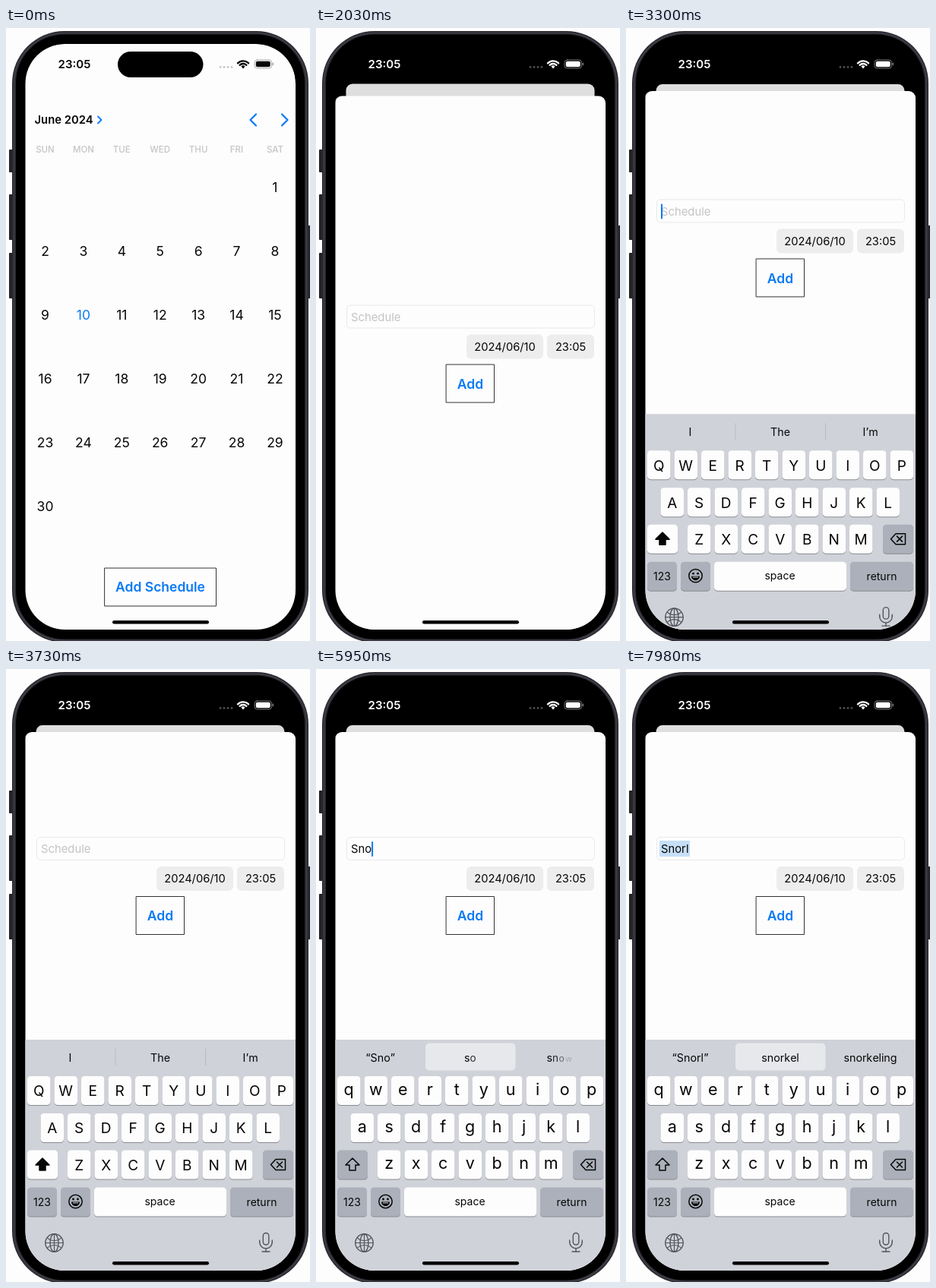
Recreate the animation shown at these times as an HTML page with a canvas. Size 400 px wide and 807 px high, loop 8000 ms.

```html
<!DOCTYPE html>
<html lang="en">
<head>
<meta charset="utf-8">
<title>Schedule app</title>
<style>
  html, body { margin: 0; width: 100%; height: 100%; overflow: hidden; background: #fdfdfd; }
  canvas { display: block; width: 400px; height: 807px; }
</style>
</head>
<body>
<canvas id="stage"></canvas>
<script>
const LOOP = 8000;
const SHEET_START = 1662, FORM_START = 3012, KEYBOARD_START = 3060;
const PAPER = '#fdfdfd', INK = '#060606', BLUE = '#0a7af5', PILL = '#ededee', FAINT = '#c4c4c6';
const KEYBOARD = '#d0d2d9', GRAY_KEY = '#abb0ba', MUTED = '#b9b9bb', ICON = '#53565c';

// Each keystroke: time, field text, whether the word is marked, suggestions.
const typing = [
  { at: FORM_START, text: '', words: ['I', 'The', 'I’m'] },
  { at: 4500, text: 'S', words: ['“S”', 'So', 'She'] },
  { at: 5190, text: 'Sn', words: ['“Sn”', 'an', 'snd'] },
  { at: 5900, text: 'Sno', words: ['“Sno”', 'so', 'snow'] },
  { at: 6540, text: 'Snor', marked: true, words: ['“Snor”', 'snot', 'snoring'] },
  { at: 7400, text: 'Snorl', marked: true, words: ['“Snorl”', 'snorkel', 'snorkeling'] }
];

const canvas = document.getElementById('stage');
const c = canvas.getContext('2d');
const dpr = window.devicePixelRatio || 1;
canvas.width = 400 * dpr;
canvas.height = 807 * dpr;

const clamp = v => Math.max(0, Math.min(1, v));
const mix = (a, b, p) => a + (b - a) * p;
const gray = (a, b, p) => `rgb(${Array(3).fill(Math.round(mix(a, b, p)))})`;

// Critically damped spring, as system transitions use.
function spring(ms) {
  const x = Math.max(0, ms) * 0.01826;
  return 1 - (1 + x) * Math.exp(-x);
}

function roundPath(x, y, w, h, r) {
  c.beginPath();
  c.roundRect(x, y, w, h, r);
}

function box(x, y, w, h, r, fill) {
  roundPath(x, y, w, h, r);
  c.fillStyle = fill;
  c.fill();
}

function frame(x, y, w, h, r, color, width = 1) {
  roundPath(x, y, w, h, r);
  c.strokeStyle = color;
  c.lineWidth = width;
  c.stroke();
}

function setFont(size, weight = 400) {
  c.font = `${weight} ${size}px Inter, sans-serif`;
}

// y is the middle of the capitals.
function label(str, x, y, size, color = INK, weight = 400, align = 'center') {
  setFont(size, weight);
  c.textAlign = align;
  c.fillStyle = color;
  c.fillText(str, x, y + size * 0.364);
}

function line(points, color, width, close) {
  c.beginPath();
  points.forEach(([x, y]) => c.lineTo(x, y));
  if (close) c.closePath();
  c.strokeStyle = color;
  c.lineWidth = width;
  c.stroke();
}

function arc(x, y, r, from, to, color, width) {
  c.beginPath();
  c.arc(x, y, r, from, to);
  c.strokeStyle = color;
  c.lineWidth = width;
  c.stroke();
}

function dot(x, y, r, color) {
  c.beginPath();
  c.arc(x, y, r, 0, 7);
  c.fillStyle = color;
  c.fill();
}

function chevron(x, y, w, h, color, width) {
  line([[x, y - h], [x + w, y], [x, y + h]], color, width);
}

function phoneBody() {
  [[160, 30], [219, 60], [296, 60]].forEach(([y, h]) => box(4, y, 6, h, 1, '#242329'));
  box(396, 260, 5, 96, 1, '#242329');
  box(8, 4, 390, 805, 69, '#2b2a31');
  frame(10.5, 6.5, 385, 800, 67, '#403f47', 1.5);
  box(13, 8.5, 380, 796, 64, '#000');
}

function statusBar(p) {
  const color = gray(6, 255, clamp((p - 0.4) * 4));
  const outline = p > 0.5 ? '#75757a' : '#a9a9ab';
  box(147, 31, 112.5, 34, 17, '#000');
  label('23:05', 90, 48, 15, color, 600);
  for (let i = 0; i < 4; i++) dot(282 + i * 5, 51.5, 1.4, p > 0.5 ? '#4e4e50' : '#c6c6c8');
  for (const r of [9.7, 6]) arc(312, 53, r, -Math.PI * 0.76, -Math.PI * 0.24, color, 2.3);
  c.beginPath();
  c.moveTo(312, 53.5);
  c.arc(312, 53, 3.5, -Math.PI * 0.76, -Math.PI * 0.24);
  c.fillStyle = color;
  c.fill();
  frame(327, 42, 22.5, 11, 3.5, outline);
  box(328.8, 43.8, 18.9, 7.4, 2, color);
  box(350.5, 45.5, 1.5, 4, 1, outline);
}

function calendar(p) {
  const scale = mix(1, 0.918, p);
  const tint = p > 0.04 ? MUTED : BLUE;
  c.save();
  c.translate(203 * (1 - scale), 54.7 * p);
  c.scale(scale, scale);
  box(25, 21, 356, 790, mix(52, 9, p), gray(253, 222, p));
  label('June 2024', 37.5, 121, 14.8, INK, 600, 'left');
  chevron(121, 121, 4.5, 4.5, BLUE, 1.8);
  chevron(329, 121, -7.5, 7.5, tint, 2.2);
  chevron(363, 121, 7.5, 7.5, tint, 2.2);
  const column = i => 51.5 + i * 50.4;
  ['SUN', 'MON', 'TUE', 'WED', 'THU', 'FRI', 'SAT'].forEach((day, i) =>
    label(day, column(i), 159.5, 11.5, FAINT, 500));
  for (let day = 1; day <= 30; day++) {
    const cell = day + 5;
    label(day, column(cell % 7), 209.5 + Math.floor(cell / 7) * 84.1, 17.5, day === 10 ? tint : INK);
  }
  frame(130, 711, 146.5, 50, 0, '#333');
  label('Add Schedule', 203, 736, 17.5, tint, 600);
  c.restore();
}

function form(t, step) {
  c.save();
  c.translate(0, 137 * (1 - spring(t - FORM_START)));
  frame(40.5, 221.5, 326, 30, 5, '#e9e9ea');
  setFont(14.8);
  const end = 46 + c.measureText(step.text).width;
  if (step.marked) box(44, 226, end - 42.5, 21, 0, '#c6dff8');
  label(step.text || 'Schedule', 46, 237, 14.8, step.text ? INK : FAINT, 400, 'left');
  if (t >= FORM_START && (t - step.at) % 1000 < 500) box(end, 227, 2, 20, 1, BLUE);
  box(198, 260, 101, 32, 6, PILL);
  label('2024/06/10', 248.5, 276, 14.7);
  box(304, 260, 62, 32, 6, PILL);
  label('23:05', 335, 276, 14.7);
  frame(171.5, 299.5, 63, 50, 0, '#333');
  label('Add', 203, 325, 17.5, BLUE, 600);
  c.restore();
}

function key(x, y, w, fill = PAPER) {
  box(x, y + 1, w, 38, 4.5, '#898b90');
  box(x, y, w, 38, 4.5, fill);
}

function suggestions(step, age, p) {
  c.save();
  c.beginPath();
  c.rect(25, 488, 356, 60 * p);
  c.clip();
  if (step.text) box(144, 492.5, 118.5, 36, 5, '#e6e8eb');
  else for (const x of [143.5, 262]) box(x, 500, 1, 22, 0, '#b9bbc1');
  step.words.forEach((word, i) => {
    setFont(14.3);
    const left = 84.5 + i * 118.5 - c.measureText(word).width / 2;
    [...word].forEach((letter, n) => {
      const shown = step.text && i ? clamp((age - n * 14) / 45) : 1;
      setFont(14.3);
      const x = left + c.measureText(word.slice(0, n)).width;
      c.globalAlpha = shown;
      setFont(mix(10, 14.3, shown));
      c.textAlign = 'left';
      c.fillStyle = INK;
      c.fillText(letter, x, 516.7);
    });
    c.globalAlpha = 1;
  });
  c.restore();
}

function shiftKey(caps) {
  key(28, 633.5, 40, caps ? PAPER : GRAY_KEY);
  const arrow = [[48, 644], [57, 653], [52, 653], [52, 660], [44, 660], [44, 653], [39, 653]];
  line(arrow, INK, 1.5, true);
  if (caps) {
    c.fillStyle = INK;
    c.fill();
  }
}

function deleteKey() {
  key(338, 633.5, 40, GRAY_KEY);
  line([[348.5, 652.5], [355, 645.5], [367.5, 645.5], [367.5, 659.5], [355, 659.5]], INK, 1.5, true);
  line([[356.5, 649], [363.5, 656]], INK, 1.5);
  line([[363.5, 649], [356.5, 656]], INK, 1.5);
}

function smileKey() {
  key(72, 682.5, 39, GRAY_KEY);
  arc(91.5, 701, 8.7, 0, 7, INK, 1.5);
  dot(88.5, 698, 1.4, INK);
  dot(94.5, 698, 1.4, INK);
  c.beginPath();
  c.arc(91.5, 701.5, 5.5, 0, Math.PI);
  c.fill();
  box(88, 702.3, 7, 1.3, 0, GRAY_KEY);
}

function globe() {
  arc(63.5, 755.5, 11.7, 0, 7, ICON, 1.4);
  c.beginPath();
  c.ellipse(63.5, 755.5, 5.5, 11.7, 0, 0, 7);
  c.stroke();
  line([[63.5, 744], [63.5, 767]], ICON, 1.2);
  line([[52, 755.5], [75, 755.5]], ICON, 1.2);
  arc(63.5, 739.5, 13, 0.8, Math.PI - 0.8, ICON, 1.2);
  arc(63.5, 771.5, 13, -Math.PI + 0.8, -0.8, ICON, 1.2);
}

function microphone() {
  frame(338.3, 742.5, 7.5, 15.5, 3.75, ICON, 1.4);
  line([[333.7, 752], [333.7, 755]], ICON, 1.4);
  line([[350.3, 752], [350.3, 755]], ICON, 1.4);
  arc(342, 754.5, 8.3, 0, Math.PI, ICON, 1.4);
  line([[342, 763], [342, 767]], ICON, 1.4);
  line([[337, 767], [347, 767]], ICON, 1.4);
}

function keyboard(t, step) {
  const p = spring(t - KEYBOARD_START);
  if (p <= 0) return;
  const caps = !step.text;
  c.save();
  c.translate(0, 304 * (1 - p));
  box(25, 488, 356, 310, 0, KEYBOARD);
  suggestions(step, t - step.at, p);
  [['QWERTYUIOP', 28, 536], ['ASDFGHJKL', 45.5, 585], ['ZXCVBNM', 81, 633.5]].forEach(([letters, left, y]) => {
    [...letters].forEach((letter, i) => {
      const x = left + i * 35.5;
      key(x, y, 30.5);
      if (caps) label(letter, x + 15.2, y + 19.5, 19);
      else label(letter.toLowerCase(), x + 15.2, y + 17, 21.5);
    });
  });
  shiftKey(caps);
  deleteKey();
  key(28, 682.5, 39, GRAY_KEY);
  label('123', 47.5, 702, 14);
  smileKey();
  key(116, 682.5, 174);
  label('space', 202.5, 701, 14);
  key(295, 682.5, 83, GRAY_KEY);
  label('return', 336.5, 702, 14);
  globe();
  microphone();
  c.restore();
}

function draw(t) {
  const p = spring(t - SHEET_START);
  const step = typing.filter(s => s.at <= t).pop() || typing[0];
  c.setTransform(dpr, 0, 0, dpr, 0, 0);
  c.lineJoin = c.lineCap = 'round';
  box(0, 0, 400, 807, 0, PAPER);
  phoneBody();

  c.save();
  roundPath(25.5, 21, 355.5, 771, 52);
  c.clip();
  calendar(p);
  statusBar(p);
  if (p > 0) {
    c.save();
    c.translate(0, 709 * (1 - p));
    box(25, 83, 356, 730, 9, PAPER);
    form(t, step);
    c.restore();
  }
  keyboard(t, step);
  box(140, 780, 127, 4.5, 2.25, '#000');
  c.restore();
}

function tick() {
  draw(performance.now() % LOOP);
  requestAnimationFrame(tick);
}
tick();
</script>
</body>
</html>
```
